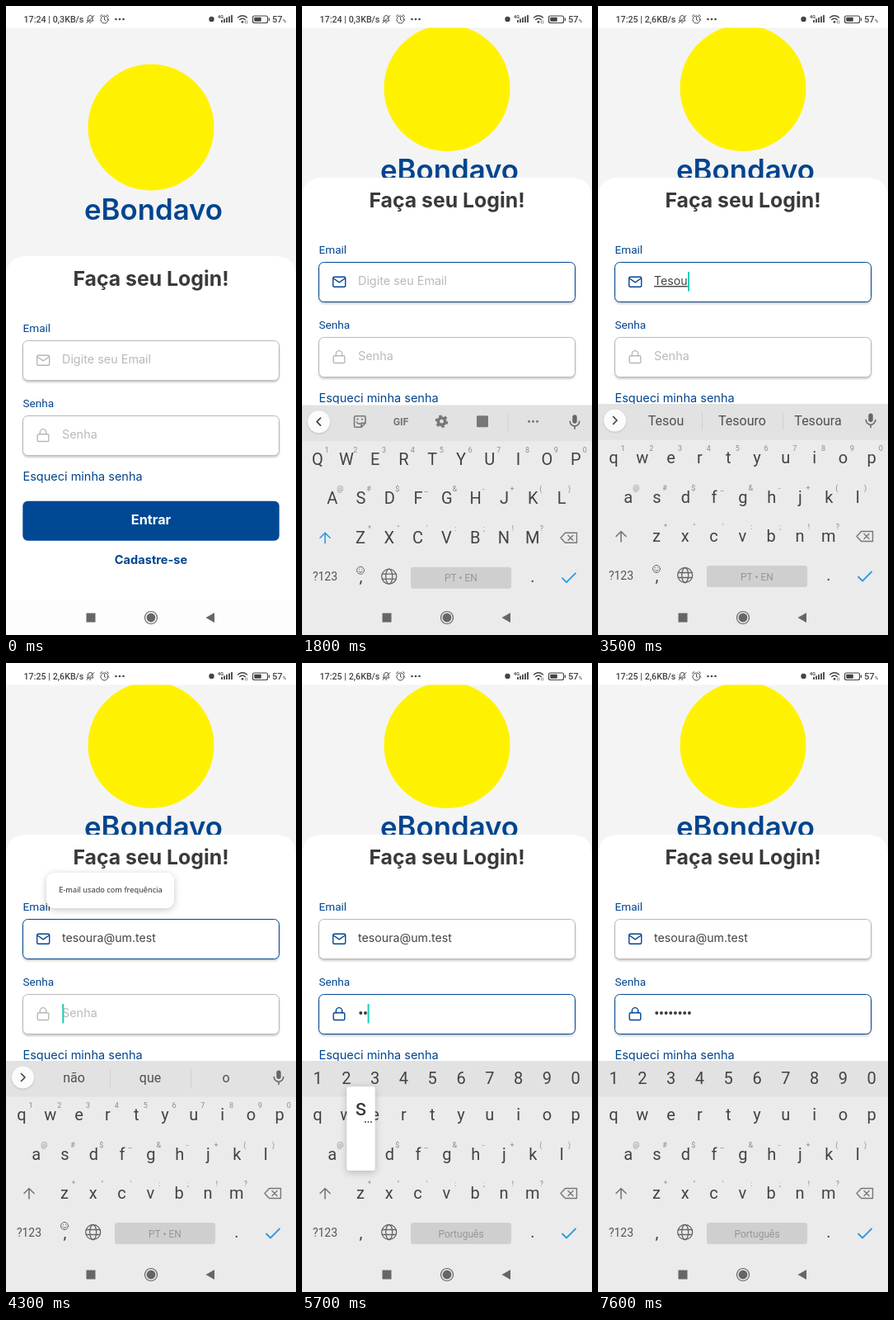
Animation of 352 by 762 pixels, one loop 8 s. Source, as an HTML page:

```html
<!DOCTYPE html>
<html lang="pt">
<head>
<meta charset="utf-8">
<title>Login</title>
<style>
  html, body { margin: 0; width: 100%; height: 100%; overflow: hidden; background: #fff; }
  svg { display: block; width: 100%; height: 100%; }
  text { font-family: Inter, sans-serif; white-space: pre; }
  .r { font-family: Roboto, sans-serif; }
  .mid { text-anchor: middle; }
  .blue { fill: #00458f; }
  .hintText { fill: #bababa; font-size: 14.4px; }
  .value { fill: #444; font-size: 14.2px; }
  .label { font-size: 13.6px; }
  .key { fill: #434343; font-size: 20px; }
  .mini { fill: #8c8c8c; font-size: 9px; }
  .word { fill: #505050; font-size: 16px; }
  .line { fill: none; stroke-linecap: round; stroke-linejoin: round; }
  .field { fill: #fff; stroke-width: 1; filter: drop-shadow(0 2px 1px rgba(0,0,0,.2)); }
  .float { fill: #fff; filter: drop-shadow(0 2px 4px rgba(0,0,0,.22)); }
</style>
</head>
<body>
<svg viewBox="0 0 352 762" preserveAspectRatio="none">
  <defs><clipPath id="app"><rect id="appBox" y="26.5" width="352" height="694"/></clipPath></defs>
  <rect width="352" height="762" fill="#fff"/>

  <g clip-path="url(#app)">
    <rect y="26" width="352" height="330" fill="#f4f4f4"/>
    <g id="head">
      <circle cx="176" cy="147" r="76.5" fill="#fff200"/>
      <text class="mid blue" x="179" y="258.5" font-size="34.8" font-weight="600">eBondavo</text>
    </g>
    <g id="form">
      <path d="M0 830V329Q0 303 26 303H326Q352 303 352 329V830Z" fill="#fff"/>
      <text class="mid" x="176" y="338.5" font-size="24.8" font-weight="700" fill="#3a393c">Faça seu Login!</text>

      <text class="r label blue" x="20.5" y="395">Email</text>
      <rect id="mailBox" class="field" x="20.5" y="405.5" width="311" height="48" rx="6"/>
      <g id="mailIcon" class="line" stroke-width="1.4">
        <rect x="37.7" y="423.2" width="15" height="12" rx="1.5"/><path d="M38.2 425l7 4.8 7-4.8"/>
      </g>
      <text id="mailHint" class="hintText" x="68" y="433">Digite seu Email</text>
      <text id="mail" class="value" x="68" y="433"></text>

      <text class="r label blue" x="20.5" y="486">Senha</text>
      <rect id="passBox" class="field" x="20.5" y="496.5" width="311" height="48" rx="6"/>
      <g id="passIcon" class="line" stroke-width="1.4">
        <rect x="38.2" y="518.7" width="13.6" height="8.8" rx="1.5"/><path d="M41.3 518.5v-2.2a3.7 3.7 0 0 1 7.4 0v2.2"/>
      </g>
      <text id="passHint" class="hintText" x="68" y="524">Senha</text>
      <g id="dots" fill="#3c3c3c"></g>
      <rect id="caret" width="2" height="23.5" fill="#1fcab8"/>

      <text class="blue" x="20.5" y="575" font-size="14.5">Esqueci minha senha</text>
      <rect x="20.3" y="599.7" width="311.4" height="48" rx="6" fill="#004894"/>
      <text class="mid" x="176" y="628" font-size="16.3" font-weight="700" fill="#fff">Entrar</text>
      <text class="mid blue" x="176" y="676" font-size="14.6" font-weight="700">Cadastre-se</text>
    </g>
  </g>

  <g id="tip">
    <rect class="float" x="49" y="254" width="155" height="43" rx="9"/>
    <text class="mid" x="127" y="278" font-size="9.25" fill="#333" style="font-family:'Noto Sans',sans-serif">E-mail usado com frequência</text>
  </g>

  <g id="board">
    <rect y="482" width="352" height="280" fill="#ebebeb"/>
    <rect y="482" width="352" height="43.5" fill="#e2e2e3"/>
    <g id="strip">
      <circle cx="20.5" cy="502" r="13.5" fill="#fbfbfb" style="filter:drop-shadow(0 1px 1px rgba(0,0,0,.15))"/>
      <path id="chevron" class="line" stroke="#444" stroke-width="1.7"/>
      <rect x="328.3" y="493.5" width="5.4" height="10.5" rx="2.7" fill="#666"/>
      <path class="line" d="M325.3 501.5a5.7 5.7 0 0 0 11.4 0M331 507.5v3" stroke="#666" stroke-width="1.6"/>
    </g>
    <g id="tools" fill="#777">
      <path class="line" d="M65 495h10.5a1.5 1.5 0 0 1 1.5 1.5v7l-5 5h-7a1.5 1.5 0 0 1-1.5-1.5v-10.5a1.5 1.5 0 0 1 1.5-1.500ZM72 508v-4.500h4.500M66.500 502.500q1.500 2.500 4 1.800" stroke="#777" stroke-width="1.6"/>
      <circle cx="67.500" cy="499" r="1.100"/><circle cx="73" cy="499" r="1.100"/>
      <text class="r mid" x="120" y="506" font-size="12.300" font-weight="700">GIF</text>
      <circle cx="169.500" cy="501.500" r="4.200" fill="none" stroke="#777" stroke-width="3.600"/>
      <circle cx="169.500" cy="501.500" r="6.600" fill="none" stroke="#777" stroke-width="2.400" stroke-dasharray="3.450"/>
      <rect x="212" y="494.500" width="14" height="14" rx="1.500"/>
      <path d="M250 491v22" stroke="#d2d2d2"/>
      <circle cx="275.500" cy="501.500" r="1.500"/><circle cx="280.500" cy="501.500" r="1.500"/><circle cx="285.500" cy="501.500" r="1.500"/>
    </g>
    <g id="words">
      <path d="M126.500 492v22M224.500 492v22" stroke="#d0d0d0"/>
    </g>
    <g id="digits"></g>
    <g id="keys"></g>
    <g id="numHints"></g>
    <g id="hints"></g>
    <path id="shift" class="line" d="M28 649v-12.500M22 642.500l6-6 6 6" stroke-width="1.600"/>
    <path class="line" d="M319.500 636.500h14v12h-14l-5.500-6ZM323 639.500l6 6M329 639.500l-6 6" stroke="#777" stroke-width="1.400"/>
    <text class="r mid" x="28" y="694.500" font-size="14" fill="#555">?123</text>
    <text class="r mid key" x="71.500" y="696.500" font-size="18">,</text>
    <g id="smile" class="line" stroke="#666" stroke-width="1">
      <circle cx="71" cy="682" r="4.500"/><path d="M68.800 683q2.200 2.800 4.400 0M69.500 680.500v.2M72.500 680.500v.2"/>
    </g>
    <g class="line" stroke="#666" stroke-width="1.300">
      <circle cx="105.700" cy="689.500" r="9"/><ellipse cx="105.700" cy="689.500" rx="4" ry="9"/><path d="M97.500 686.500h16.400M97.500 692.500h16.400"/>
    </g>
    <rect x="132" y="678" width="122" height="26" rx="3" fill="#cfcfcf"/>
    <text id="space" class="r mid" x="193" y="695.500" font-size="12" fill="#969696"></text>
    <text class="r mid key" x="280" y="696">.</text>
    <path class="line" d="M316 691.500l5 5 11-11" stroke="#2b9be0" stroke-width="1.800"/>
    <g id="popup">
      <rect class="float" x="-17.200" y="-82" width="34.400" height="102" rx="3"/>
      <text id="popText" class="r mid" y="-47" font-size="27" fill="#333"></text>
      <text class="r mid" x="9" y="-38" font-size="12" font-weight="700" fill="#444">...</text>
    </g>
  </g>

  <g>
    <rect id="navBg" y="721" width="352" height="41"/>
    <rect x="97.500" y="735.500" width="11" height="11" fill="#666"/>
    <circle cx="176" cy="741" r="7.500" fill="none" stroke="#666" stroke-width="1.200"/><circle cx="176" cy="741" r="5.400" fill="#666"/>
    <path d="M253 735v12l-10.500-6Z" fill="#666"/>
  </g>

  <g fill="#444">
    <text id="clock" class="r" x="21.500" y="20" font-size="10.700" font-weight="500"></text>
    <g class="line" stroke="#444" stroke-width="1">
      <path d="M98.500 18h7.500l-1-1.800v-2.400a2.800 2.800 0 0 0-5.500 0v2.400ZM101.500 20h1.500M98 20.500l9-9"/>
      <circle cx="119.500" cy="16.500" r="4.500"/><path d="M119.500 13.800v2.900l1.800 1M114.500 12.500l2.200-1.800M124.500 12.500l-2.200-1.800"/>
    </g>
    <circle cx="133.500" cy="16" r="1.300"/><circle cx="138" cy="16" r="1.300"/><circle cx="142.500" cy="16" r="1.300"/>
    <circle cx="249.500" cy="16" r="3.200"/>
    <text class="r" x="257" y="14.500" font-size="5.500" font-weight="700">4G</text>
    <path d="M262 20v-3M265 20v-4.500M268 20v-6M271 20v-7.500M274 20v-9" stroke="#444" stroke-width="1.800"/>
    <path class="line" d="M281.500 14q5.500-4.500 11 0M283.700 16.500q3.300-2.600 6.600 0" stroke="#444" stroke-width="1.400"/>
    <circle cx="287" cy="19.300" r="1.400"/><path d="M290.500 17.500v4M292.500 17.500v4" stroke="#777" stroke-width=".8"/>
    <rect x="299.500" y="12" width="18" height="8.500" rx="2" fill="none" stroke="#444" stroke-width="1.200"/>
    <rect x="301.300" y="13.800" width="8.500" height="4.900" rx=".8"/><rect x="318.800" y="14.500" width="1.200" height="3.500"/>
    <text class="r" x="323" y="20" font-size="11.200" font-weight="500">57<tspan font-size="6">%</tspan></text>
  </g>
</svg>

<script>
const LOOP = 8000, STEP = 34.8;
const $ = id => document.getElementById(id);
const put = (node, attrs) => { for (const k in attrs) node.setAttribute(k, attrs[k]); return node; };
const add = (parent, tag, attrs, text = '') => {
  const node = put(document.createElementNS('http://www.w3.org/2000/svg', tag), attrs);
  node.textContent = text;
  return parent.appendChild(node);
};
const show = (id, on) => { $(id).style.display = on ? '' : 'none'; };
const setText = (node, s) => { if (node.textContent !== s) node.textContent = s; };
const at = (steps, t) => steps.filter(s => s[0] <= t).pop();

// Keys: letters, hints, first x, centre y
const rows = [
  ['qwertyuiop', '1234567890', 19, 547],
  ['asdfghjkl', '@#$_&-+()', 36.7, 594.5],
  ['zxcvbnm', '*"\':;!?', 71, 642]
];
const place = {}, keys = [];
rows.forEach(([letters, hints, x0, y], r) => [...letters].forEach((c, i) => {
  const x = x0 + i * STEP;
  place[c] = [x, y];
  keys.push([add($('keys'), 'text', { class: 'r mid key', x, y: y + 7 }), c]);
  add($(r ? 'hints' : 'numHints'), 'text', { class: 'r mid mini', x: x + (r === 1 ? 9.5 : 11), y: y - 8 }, hints[i]);
}));
[...'1234567890'].forEach((c, i) => {
  const x = 19 + i * STEP;
  place[c] = [x, 503];
  add($('digits'), 'text', { class: 'r mid key', x, y: 510 }, c);
});
const words = [82.5, 175, 267].map(x => add($('words'), 'text', { class: 'r mid word', x, y: 508 }));
const dots = Array.from({ length: 8 }, (_, i) => add($('dots'), 'circle', { cx: 71.3 + i * 5.65, cy: 519, r: 2 }));

const mailSteps = [[0, ''], [2400, 'T'], [2500, 'Te'], [2700, 'Tes'], [2900, 'Teso'], [3100, 'Tesou'], [3600, 'tesoura@um.test']];
const passSteps = [[0, 0], [5200, 1], [5500, 2], [5800, 3], [5900, 4], [6100, 5], [6600, 6], [6700, 7], [7100, 8]];
const wordSteps = [
  [0, 'Te', 'Tem', 'Tenho'], [2700, 'Tes', 'Tese', 'Teses'], [2900, 'Teso', 'Tesouro', 'Tesoura'],
  [3100, 'Tesou', 'Tesouro', 'Tesoura'], [3600, 'não', 'que', 'o']
];
const presses = [
  [2300, 'T'], [2400, 'e'], [2600, 's'], [2800, 'o'], [3000, 'u'],
  [5100, 't'], [5400, 'e'], [5700, 's'], [5800, 't'], [6000, 'e'],
  [6500, '1'], [6600, '2'], [7000, '3']
];
const caretSteps = [[1900], [4300], ...mailSteps.slice(1), ...passSteps.slice(1)].sort((a, b) => a[0] - b[0]);

function drawForm(t) {
  const up = t >= 1500, focus = t < 1000 ? '' : t < 4400 ? 'mail' : 'pass';
  put($('head'), { transform: `translate(0 ${up ? -47.5 : 0})` });
  put($('form'), { transform: `translate(0 ${up ? -95 : 0})` });
  put($('appBox'), { height: up ? 455.5 : 694 });

  const mail = at(mailSteps, t)[1], count = at(passSteps, t)[1];
  setText($('mail'), mail);
  $('mail').style.textDecoration = t < 3600 ? 'underline' : 'none';
  show('mailHint', !mail);
  show('passHint', !count);
  dots.forEach((d, i) => { d.style.display = i < count ? '' : 'none'; });
  [['mail', mail], ['pass', count]].forEach(([id, filled]) => {
    put($(id + 'Box'), { stroke: focus === id ? '#00458f' : '#b8b8b8' });
    put($(id + 'Icon'), { stroke: focus === id || filled ? '#00458f' : '#b8b8b8' });
  });

  const edit = at(caretSteps, t);
  show('caret', edit && (t - edit[0]) % 1000 < 500);
  const inPass = t >= 4300;
  const x = inPass ? 68.3 + count * 5.65 : 68.3 + (mail ? $('mail').getComputedTextLength() : 0);
  put($('caret'), { x, y: inPass ? 508 : 417 });

  show('tip', t >= 3700 && t < 4600);
  $('tip').style.opacity = Math.max(0, Math.min(1, (4600 - t) / 200));
}

function drawBoard(t) {
  const open = t >= 1650, caps = t < 2400, secret = t >= 4600;
  show('board', open);
  put($('navBg'), { fill: open ? '#ebebeb' : '#fdfdfd' });
  if (!open) return;
  const left = Math.max(0, 1 - (t - 1600) / 300);
  put($('board'), { transform: `translate(0 ${239 * left ** 4.5})` });

  keys.forEach(([node, c]) => setText(node, caps ? c.toUpperCase() : c));
  show('strip', !secret);
  show('tools', caps);
  show('words', !caps && !secret);
  show('digits', secret);
  show('numHints', !secret);
  show('smile', !secret);
  put($('chevron'), { d: caps ? 'M22.5 497.5l-4.5 4.5 4.5 4.5' : 'M18.5 497.5l4.5 4.5-4.5 4.5' });
  put($('shift'), { stroke: caps ? '#2b9be0' : '#777' });
  setText($('space'), secret ? 'Português' : 'PT • EN');
  at(wordSteps, t).slice(1).forEach((w, i) => setText(words[i], w));

  const press = at(presses, t), held = press && t < press[0] + 100;
  show('popup', held);
  if (held) {
    const [x, y] = place[press[1].toLowerCase()];
    put($('popup'), { transform: `translate(${x} ${y + 0.5})` });
    setText($('popText'), press[1]);
  }
}

function frame(now) {
  const t = now % LOOP;
  setText($('clock'), `17:2${t < 3000 ? 4 : 5} | ${t < 3500 ? '0,3' : '2,6'}KB/s`);
  drawForm(t);
  drawBoard(t);
}

let start;
function tick(now) {
  start ??= now;
  frame(now - start);
  requestAnimationFrame(tick);
}
frame(0);
requestAnimationFrame(tick);
</script>
</body>
</html>
```
